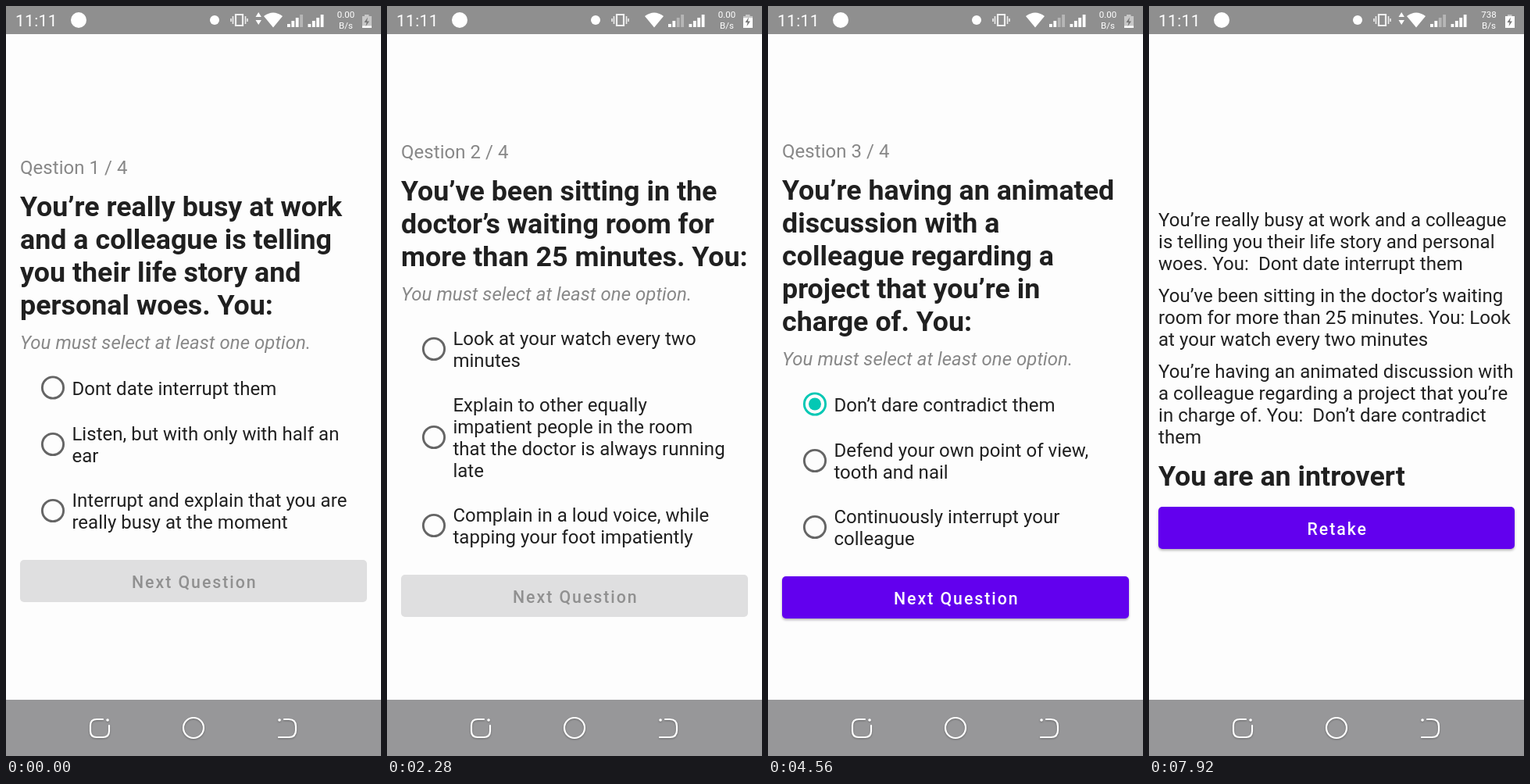
An HTML page that plays this animation: 480x960 px, repeating every 8 s.

```html
<!DOCTYPE html>
<html lang="en">
<head>
<meta charset="utf-8">
<title>Quiz</title>
<style>
  html, body { margin: 0; width: 100%; height: 100%; overflow: hidden; background: #fdfdfd; }
  svg { display: block; width: 480px; height: 960px; font-family: Roboto, sans-serif; }
  text { white-space: pre; fill: #202020; }
  .body { font-size: 24px; letter-spacing: .04px; }
  .muted { fill: #888; }
  .hint { font-style: italic; }
  .title { font-size: 35.8px; font-weight: 700; }
  .label { font-size: 21.3px; font-weight: 500; letter-spacing: 1.95px; text-anchor: middle; }
  .clock { font-size: 21px; letter-spacing: .3px; fill: #fff; }
  .speed { font-size: 11.5px; text-anchor: middle; fill: #fff; }
  .shadow { filter: drop-shadow(0 2px 1.5px rgba(0, 0, 0, .28)); }
</style>
</head>
<body>
<svg id="stage" viewBox="0 0 480 960"></svg>
<script>
const LOOP = 8000;
const HINT = 'You must select at least one option.';
const PAPER = '#fdfdfd', PURPLE = '#6200ee', PRESSED = '#9448f2', DISABLED = '#dfdfe0';
const TEAL = '#03c8b4', RING = '#656565';

// Times in ms: show, touch (row pressed), check (radio set), tap (button pressed).
const questions = [
  { show: 0, touch: 40, check: 200, tap: 1040, pick: 0, top: 215, button: 'Next Question',
    title: ['You’re really busy at work', 'and a colleague is telling', 'you their life story and', 'personal woes. You:'],
    options: [['Dont date interrupt them'], ['Listen, but with only with half an', 'ear'],
      ['Interrupt and explain that you are', 'really busy at the moment']] },
  { show: 1400, touch: 2360, check: 2400, tap: 3000, pick: 0, top: 195, button: 'Next Question',
    title: ['You’ve been sitting in the', 'doctor’s waiting room for', 'more than 25 minutes. You:'],
    options: [['Look at your watch every two', 'minutes'],
      ['Explain to other equally', 'impatient people in the room', 'that the doctor is always running', 'late'],
      ['Complain in a loud voice, while', 'tapping your foot impatiently']] },
  { show: 3160, touch: 3920, check: 3960, tap: 5040, pick: 0, top: 194, button: 'Next Question',
    title: ['You’re having an animated', 'discussion with a', 'colleague regarding a', 'project that you’re in', 'charge of. You:'],
    options: [['Don’t dare contradict them'], ['Defend your own point of view,', 'tooth and nail'],
      ['Continuously interrupt your', 'colleague']] },
  { show: 5080, touch: 6880, check: 6920, tap: 7560, pick: 1, top: 195, button: 'Done',
    title: ['You are taking part in a', 'guided tour of a museum.', 'You:'],
    options: [['Are a bit too far towards the', 'back so don’t really hear what', 'the guide is saying'],
      ['Make sure that everyone is able', 'to hear properly'],
      ['Are right up the front, adding', 'your own comments in a loud', 'voice']] }
];
const RESULT_AT = 7840;

const text = (x, y, cls, str) => `<text x="${x}" y="${y}" class="${cls}">${str}</text>`;
const lines = (x, y, step, cls, list) => list.map((s, i) => text(x, y + i * step, cls, s)).join('');
const rect = (x, y, w, h, extra = '') => `<rect x="${x}" y="${y}" width="${w}" height="${h}" ${extra}/>`;
const button = (x, y, label) =>
  rect(x, y, 480 - 2 * x, 54, `rx="5" class="face shadow" fill="${PURPLE}"`) +
  `<text x="241.3" y="${y + 36}" class="label" style="fill:${PAPER}">${label}</text>`;

function optionRow(list, y, h) {
  const mid = y + h / 2;
  const pad = (h - 28 * list.length - 29) / 2;
  return `<g class="row">${rect(30, y, 420, h - 1, 'class="glow" fill="#dedede" opacity="0"')}
    <circle class="ring" cx="60" cy="${mid}" r="13.6" fill="none" stroke="${RING}" stroke-width="2.9"/>
    <circle class="dot" cx="60" cy="${mid}" r="0" fill="${TEAL}"/>
    ${lines(84.4, y + 37.5 + pad, 28, 'body', list)}</g>`;
}

function questionScreen(q, index) {
  const titleY = q.top + 54;
  const hintY = titleY + 42 * (q.title.length - 1) + 44;
  let y = hintY + 19.5, rows = '';
  for (const list of q.options) {
    const h = Math.max(60, 28 * list.length + 29);
    rows += optionRow(list, y, h);
    y += h;
  }
  return `<g class="screen">
    ${text(18, q.top, 'body muted', `Qestion ${index + 1} / 4`)}
    ${lines(18, titleY, 42, 'title', q.title)}
    ${text(18, hintY, 'body muted hint', HINT)}
    ${rows}${button(18, Math.round(y + 20), q.button)}</g>`;
}

const resultScreen = () => `<g class="screen">
  ${lines(12, 282, 28, 'body', ['You’re really busy at work and a colleague',
    'is telling you their life story and personal', 'woes. You:  Dont date interrupt them'])}
  ${lines(12, 379, 28, 'body', ['You’ve been sitting in the doctor’s waiting',
    'room for more than 25 minutes. You: Look', 'at your watch every two minutes'])}
  ${lines(12, 476, 28, 'body', ['You’re having an animated discussion with',
    'a colleague regarding a project that you’re', 'in charge of. You:  Don’t dare contradict', 'them'])}
  ${text(12, 614, 'title', 'You are an introvert')}
  ${button(12, 641, 'Retake')}</g>`;

const signal = (x, id) => [0, 1, 2, 3].map(i =>
  rect(x + i * 5.4, 23 - i * 4, 3.8, 4 + i * 4, `class="${id}"`)).join('');

const statusBar = () => `${rect(0, 0, 480, 36, 'fill="#8f8f8f"')}
  ${text(12, 25.5, 'clock', '11:11')}
  <g fill="#fff">
    <circle cx="93" cy="18" r="10"/>
    <circle cx="267" cy="18" r="6"/>
    <g fill="none" stroke="#fff" opacity=".85">
      <path d="M294 11h9v14h-9z" stroke-width="2.2"/>
      <path d="M290.5 13v10M306.5 13v10M288 16v4M309 16v4" stroke-width="1.6"/>
    </g>
    <path id="arrows" d="M319.5 14l3.7-6 3.7 6zM319.5 18l3.7 6 3.7-6z"/>
    <path d="M330 13Q342 4 354 13L342 27.5Z"/>
    ${signal(360, 'sim1')}${signal(386.5, 'sim2')}
    <path d="M459 11h5.5v2h3.5v15h-12v-15h3z" opacity=".5"/>
    <rect id="charge" x="456" width="12"/>
    <path d="M463 14.5l-4.5 6.5h3l-1 5 4.500-6.500h-3z" fill="#777"/>
  </g>
  <text id="speed" class="speed" x="435" y="15"></text>
  ${text(435, 29, 'speed', 'B/s')}`;

const navBar = () => `${rect(0, 888, 480, 72, 'fill="#979799"')}
  <g fill="none" stroke="#fff" stroke-width="2.2" stroke-linecap="round"
     style="filter:drop-shadow(0 1px 1px rgba(0,0,0,.3))">
    <path d="M124 913h-8q-8 0-8 8v7q0 8 8 8h8q8 0 8-8v-7"/>
    <circle cx="240" cy="924" r="13"/>
    <path d="M356 913h6q9 0 9 9v5q0 9-9 9h-13"/>
    <path d="M130 914h.1M350 914h.1" stroke-width="3.6"/>
  </g>`;

const stage = document.getElementById('stage');
stage.innerHTML = rect(0, 0, 480, 960, `fill="${PAPER}"`) +
  questions.map(questionScreen).join('') + resultScreen() + statusBar() + navBar();

const screens = [...stage.querySelectorAll('.screen')];
const byId = id => document.getElementById(id);
const set = (el, attrs) => { for (const k in attrs) el.setAttribute(k, attrs[k]); };
const clamp = v => Math.max(0, Math.min(1, v));
const easeOut = v => 1 - (1 - clamp(v)) ** 2;
const latest = (steps, t) => steps.filter(s => s[0] <= t).pop()[1];

const chargeSteps = [[0, .15], [200, .45], [1400, .75], [2560, 1], [4560, .15], [5560, .45], [6560, .8], [7560, 1]];
const speedSteps = [[0, '0.00'], [5920, '91.0'], [7840, '738']];

function drawQuestion(screen, q, t) {
  const row = screen.querySelectorAll('.row')[q.pick];
  const checked = t >= q.check;
  const glow = t < q.touch ? 0 : 1 - clamp((t - q.check) / 240);
  set(row.querySelector('.glow'), { opacity: glow });
  set(row.querySelector('.ring'), { stroke: checked ? TEAL : RING });
  set(row.querySelector('.dot'), { r: 8 * easeOut((t - q.check) / 160) });
  set(screen.querySelector('.face'), {
    fill: !checked ? DISABLED : t >= q.tap ? PRESSED : PURPLE,
    class: checked ? 'face shadow' : 'face'
  });
  screen.querySelector('.label').style.fill = checked ? PAPER : '#909090';
}

function drawStatus(t) {
  const level = 17 * latest(chargeSteps, t);
  set(byId('charge'), { y: Math.max(13, 28 - level), height: Math.min(15, level) });
  byId('speed').textContent = latest(speedSteps, t);
  set(byId('arrows'), { opacity: t < 1400 || t >= RESULT_AT ? 1 : 0 });
  const bright = t < 200 ? 3 : 2;
  stage.querySelectorAll('.sim1').forEach((bar, i) => set(bar, { opacity: i < bright ? 1 : .35 }));
}

function draw(t) {
  const active = t >= RESULT_AT ? 4 : questions.filter(q => q.show <= t).length - 1;
  screens.forEach((s, i) => set(s, { visibility: i === active ? 'visible' : 'hidden' }));
  if (active < 4) drawQuestion(screens[active], questions[active], t);
  drawStatus(t);
}

const start = performance.now();
function tick() {
  draw((performance.now() - start) % LOOP);
  requestAnimationFrame(tick);
}
tick();
</script>
</body>
</html>
```
